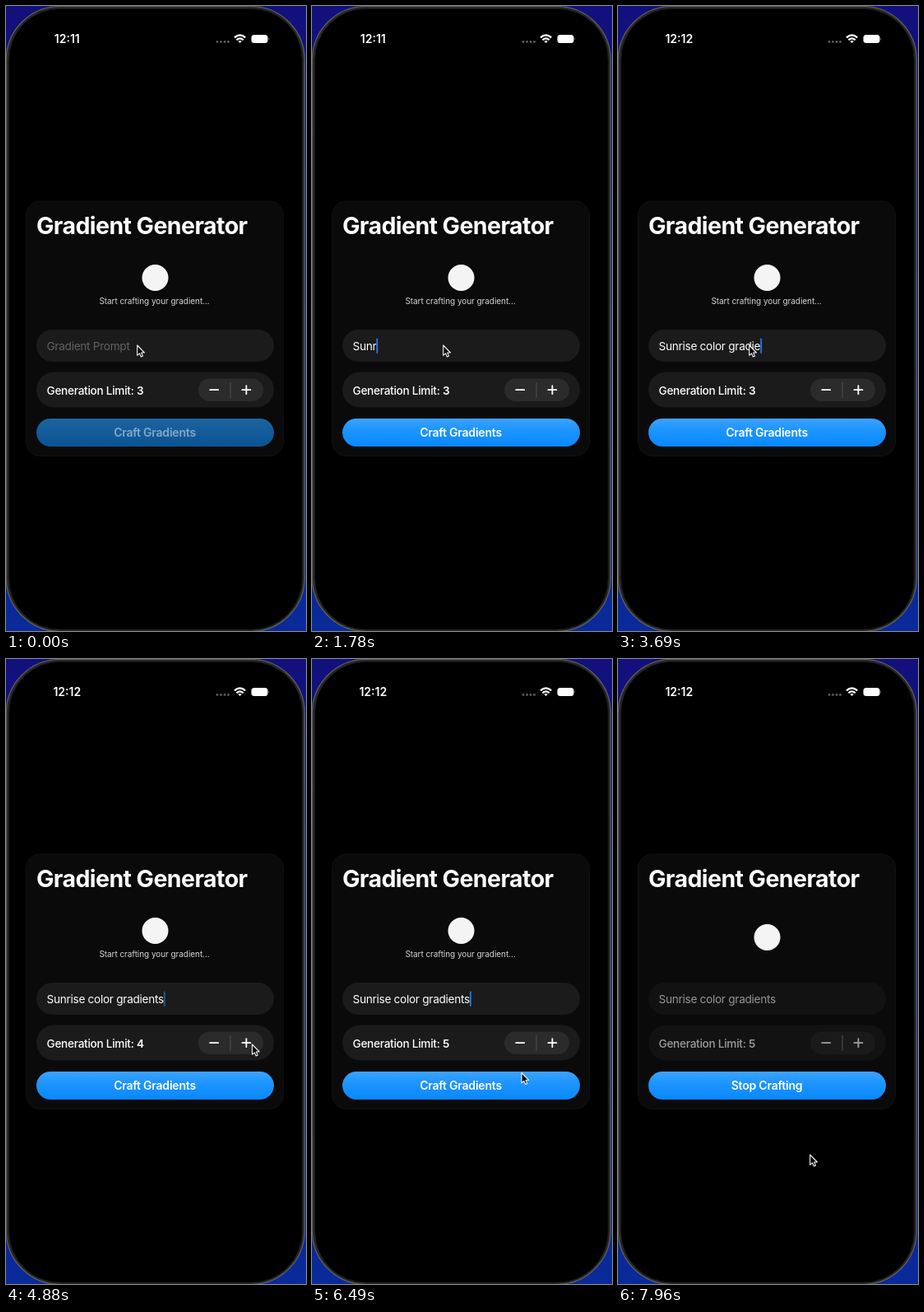
An HTML page for the animation above (8 s loop, 365 px wide and 759 px high).

```html
<!DOCTYPE html>
<html lang="en">
<head>
<meta charset="utf-8">
<title>Gradient Generator</title>
<style>
  html, body { margin: 0; width: 100%; height: 100%; overflow: hidden; background: #000; }
  svg { display: block; width: 365px; height: 759px; }
  text { font-family: Inter, Roboto, sans-serif; white-space: pre; fill: #fff; }
  .title { font-size: 28.5px; font-weight: 700; letter-spacing: -.02em; }
  .body { font-size: 13.6px; letter-spacing: -.02em; }
  .button { font-size: 14px; font-weight: 600; letter-spacing: -.015em; text-anchor: middle; }
  .caption { font-size: 10px; letter-spacing: -.006em; text-anchor: middle; fill: #d4d4d4; }
  .clock { font-size: 14px; font-weight: 600; text-anchor: middle; }
  .line { fill: none; stroke: #fff; stroke-width: 1.8; stroke-linecap: round; }
</style>
</head>
<body>
<svg viewBox="0 0 365 759">
  <defs>
    <linearGradient id="backdrop" x2="0" y2="1">
      <stop stop-color="#12107c"/><stop offset="1" stop-color="#0a2a9a"/>
    </linearGradient>
    <linearGradient id="enabled" x2="0" y2="1">
      <stop stop-color="#3ba3ff"/><stop offset=".4" stop-color="#1e95ff"/><stop offset="1" stop-color="#0888ff"/>
    </linearGradient>
    <linearGradient id="disabled" x2="0" y2="1">
      <stop stop-color="#1d639f"/><stop offset="1" stop-color="#0a5494"/>
    </linearGradient>
  </defs>

  <rect width="365" height="759" fill="url(#backdrop)"/>
  <rect x=".3" y=".5" width="363" height="759" rx="65" fill="#282828" stroke="#62605a" stroke-width="1.2"/>
  <rect x="3.8" y="3.5" width="356.4" height="753.5" rx="61.5" stroke="#111" stroke-width="1"/>

  <text id="clock" class="clock" x="74.3" y="45"></text>
  <g fill="#5c5c5e">
    <circle cx="257" cy="43.5" r="1.4"/><circle cx="261.5" cy="43.5" r="1.4"/>
    <circle cx="266" cy="43.5" r="1.4"/><circle cx="270.5" cy="43.5" r="1.4"/>
  </g>
  <g class="line" style="stroke-width:2.2;stroke-linecap:butt">
    <path d="M278 38.4Q284.6 32.2 291.2 38.4M280.4 41.3Q284.6 37.4 288.8 41.3"/>
    <path d="M282.4 42.8Q284.6 41 286.8 42.8L284.6 45Z" fill="#fff" stroke="none"/>
  </g>
  <rect x="298.5" y="35" width="20" height="10" rx="3.5" fill="#fff"/>
  <path d="M319.5 38.3q1.8 1.7 0 3.4z" fill="#888"/>

  <rect x="24.5" y="237" width="313" height="309.5" rx="17" fill="#0a0a0a" stroke="#111"/>
  <text class="title" x="37" y="276.5">Gradient Generator</text>
  <circle id="mark" cx="181.5" r="16" fill="#f4f4f4"/>
  <text id="caption" class="caption" x="180.5" y="362">Start crafting your gradient...</text>

  <g id="panels">
    <rect x="37" y="393" width="289" height="39" rx="19.5"/>
    <rect x="37" y="444.5" width="289" height="43" rx="21.5"/>
  </g>
  <text id="prompt" class="body" x="49.5" y="417.7"></text>
  <rect id="caret" y="403.5" width="1.8" height="18.5" rx=".9" fill="#1f7df0"/>

  <rect id="stepper" x="234" y="452.5" width="79" height="27.5" rx="13.7"/>
  <path d="M273 457v19" stroke="#48484b" stroke-width="1.3"/>
  <g id="controls">
    <text class="body" x="49.5" y="471.6" font-weight="500">Generation Limit: <tspan id="limit" font-weight="600"></tspan></text>
    <path class="line" d="M248.2 466.2h10M287.4 466.2h10M292.4 461.2v10"/>
  </g>

  <rect id="button" x="37" y="501" width="289" height="34" rx="17"/>
  <text id="action" class="button" x="181" y="523"></text>

  <path id="pointer" d="M0 0V12.3L2.8 9.8L4.7 14L6.8 13.1L5 9H8.7Z" fill="#080808" stroke="#f4f4f4" stroke-width="1.1" stroke-linejoin="round"/>
</svg>

<script>
const LOOP = 8000, TICK = 147.4;
const PHRASE = 'Sunrise color gradients';
const TYPE_START = 1300, TYPE_RATE = 114;
const FOCUS = 880, BLINK = 4310, SUBMIT = 7150;

// time, x, y
const POINTER_PATH = [
  [0, 159.7, 412], [3950, 159.7, 412], [4560, 299.5, 468],
  [5600, 299.5, 468], [6280, 255, 502.5], [7180, 255, 502.5],
  [7750, 233.7, 602], [LOOP, 233.7, 602]
];

const ui = Object.fromEntries([...document.querySelectorAll('svg [id]')].map(el => [el.id, el]));
const clamp = v => Math.min(1, Math.max(0, v));
const mix = (a, b, k) => a + (b - a) * k;
const ease = k => k * k * (3 - 2 * k);
const gray = v => `rgb(${v},${v},${v})`;

function pointerAt(t) {
  const i = Math.max(1, POINTER_PATH.findIndex(p => p[0] > t));
  const [t0, x0, y0] = POINTER_PATH[i - 1], [t1, x1, y1] = POINTER_PATH[i];
  const k = ease(clamp((t - t0) / (t1 - t0)));
  return [mix(x0, x1, k), mix(y0, y1, k)];
}

function caretOpacity(t) {
  if (t < FOCUS || t >= SUBMIT) return 0;
  if (t < BLINK) return 1;
  const phase = (t - BLINK) / 1000 % 1;
  return phase < .8 ? clamp((.65 - phase) / .15) : clamp((phase - .8) / .15);
}

function draw(t) {
  const count = Math.min(PHRASE.length, Math.max(0, Math.floor((t - TYPE_START) / TYPE_RATE)));
  const crafting = t >= SUBMIT;
  const dim = ease(clamp((t - SUBMIT) / 350));

  ui.clock.textContent = t < 3250 ? '12:11' : '12:12';
  ui.limit.textContent = t < 4750 ? 3 : t < 5350 ? 4 : 5;

  ui.prompt.textContent = count ? PHRASE.slice(0, count) : 'Gradient Prompt';
  ui.prompt.style.fill = gray(count ? mix(255, 150, dim) : 98);
  ui.caret.setAttribute('x', 49.5 + (count ? ui.prompt.getComputedTextLength() : 0));
  ui.caret.setAttribute('opacity', caretOpacity(t));

  ui.panels.setAttribute('fill', gray(mix(27, 18, dim)));
  ui.stepper.setAttribute('fill', gray(mix(43, 26, dim)));
  ui.controls.setAttribute('opacity', mix(1, .58, dim));
  ui.caption.setAttribute('opacity', 1 - dim);
  ui.mark.setAttribute('cy', mix(330, 338, dim));

  ui.button.setAttribute('fill', `url(#${count ? 'enabled' : 'disabled'})`);
  ui.action.textContent = crafting ? 'Stop Crafting' : 'Craft Gradients';
  ui.action.style.fill = count ? '#fff' : '#86a8c8';

  ui.pointer.setAttribute('transform', `translate(${pointerAt(t)})`);
}

const start = performance.now();
function frame() {
  const t = (performance.now() - start) % LOOP;
  draw(Math.floor(t / TICK + .01) * TICK);
  requestAnimationFrame(frame);
}
frame();
</script>
</body>
</html>
```
